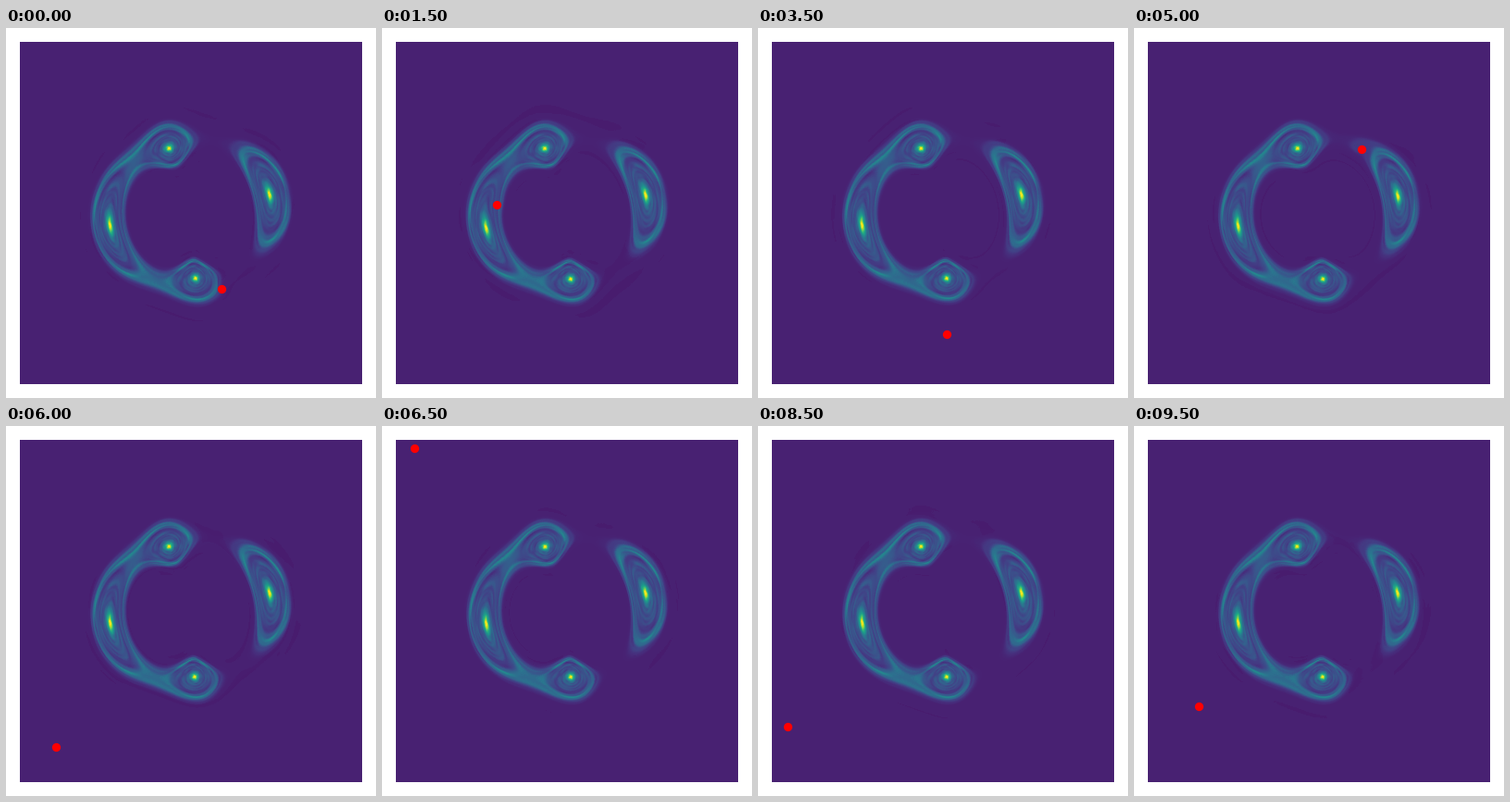
These frames come from a looping animation (400 px wide and 400 px high, 10000 ms). A matplotlib script:

```python
import numpy as np
import matplotlib.pyplot as plt
from matplotlib.animation import FuncAnimation

STAGE, MARGIN, SIZE = 400, 15, 370
INTERVAL = 500
BACKGROUND = 0.09

# Elliptical lens with external shear; its long axis leans away from the vertical.
LENS_CENTER = (195.3, 201.0)
LEAN = np.radians(11)
AXIS_RATIO, STRENGTH, SHEAR, BEND = 0.36, 55.7, -0.07, 0.004
SOURCE = (4.7, 1.2)

# Where the small perturbing mass lands at each step.
DOTS = [(233, 282), (200, 38), (160, 372), (124, 191), (324, 200),
        (66, 367), (26, 45), (204, 331), (66, 363), (341, 308),
        (246, 131), (200, 200), (54, 347), (35, 24), (230, 101),
        (66, 200), (190, 190), (32, 325), (210, 205), (70, 303)]

Y, X = np.mgrid[0:SIZE, 0:SIZE] + MARGIN + 0.5


def lens_frame(x, y):
    """Stage position in axes centred on the lens and turned with it."""
    dx, up = x - LENS_CENTER[0], LENS_CENTER[1] - y
    return (dx * np.cos(LEAN) + up * np.sin(LEAN),
            up * np.cos(LEAN) - dx * np.sin(LEAN))


def deflect(x, y):
    """Trace each pixel back to the plane of the lensed galaxy."""
    s = np.sqrt(1 - AXIS_RATIO ** 2)
    psi = np.hypot(x, AXIS_RATIO * y)
    ax = STRENGTH * np.arctanh(s * x / psi)
    ay = STRENGTH * np.arctan(s * y / psi)
    radius = np.hypot(x, y)
    bend = BEND * (radius - np.hypot(ax, ay)) ** 2 / radius
    return x * (1 - SHEAR - bend) - ax, y * (1 + SHEAR - bend) - ay


def polar_noise(rng, radial, angular, shape=(200, 192)):
    """Unit noise over radius (quarter pixels) and angle, smoothed along each."""
    fr, fa = np.fft.fftfreq(shape[0])[:, None], np.fft.fftfreq(shape[1])
    kernel = np.exp(-2 * np.pi ** 2 * ((radial * fr) ** 2 + (angular * fa) ** 2))
    noise = np.fft.ifft2(np.fft.fft2(rng.normal(size=shape)) * kernel).real
    return noise / noise.std()


def sample(noise, radius, angle):
    rows = np.minimum(radius * 4, noise.shape[0] - 1).astype(int)
    cols = (angle / (2 * np.pi) * noise.shape[1]).astype(int) % noise.shape[1]
    return noise[rows, cols]


GRID = lens_frame(X, Y)
TRACED = deflect(*GRID)
rng = np.random.default_rng(7)
TEXTURE = 0.75 * polar_noise(rng, 2, 7) + 0.5 * polar_noise(rng, 5, 14)


def galaxy(x, y, smudges):
    radius = np.hypot(x, y)
    angle = np.arctan2(y, x) + 0.06 * radius
    disk = 0.11 / (1 + np.exp(np.clip((radius - 22.3) / 0.7, -40, 40)))
    ring = 0.14 * np.exp(-((radius - 18.3) / 1.8) ** 2)
    bulge = np.exp(-(radius / 3.2) ** 1.15)
    grain = np.clip(1 + 0.32 * sample(TEXTURE, radius, angle), 0.2, 1.8)
    outskirts = (radius > 23) & (radius < 33)
    stains = 0.012 * outskirts * (sample(smudges, radius, angle) > 1.2)
    return (disk + ring) * grain + bulge - stains


def brightness(index):
    px, py = lens_frame(*DOTS[index])
    dx, dy = GRID[0] - px, GRID[1] - py
    pull = 30 / (dx ** 2 + dy ** 2 + 80)
    smudges = polar_noise(np.random.default_rng(index), 5, 6)
    light = galaxy(TRACED[0] - pull * dx - SOURCE[0],
                   TRACED[1] - pull * dy - SOURCE[1], smudges)
    return np.clip(BACKGROUND + light, 0, 1)


fig = plt.figure(figsize=(4, 4), dpi=100, facecolor="white")
inset = MARGIN / STAGE
ax = fig.add_axes([inset, inset, SIZE / STAGE, SIZE / STAGE])
ax.axis("off")
bounds = (MARGIN, MARGIN + SIZE, MARGIN + SIZE, MARGIN)
picture = ax.imshow(brightness(0), cmap="viridis", vmin=0, vmax=1,
                    extent=bounds, interpolation="nearest")
marker, = ax.plot([], [], "o", color="red", markersize=5.7, clip_on=False)
ax.set_xlim(bounds[:2])
ax.set_ylim(bounds[2:])


def update(index):
    x, y = DOTS[index]
    picture.set_data(brightness(index))
    marker.set_data([x - 0.3], [y - 0.3])
    return picture, marker


animation = FuncAnimation(fig, update, frames=len(DOTS), interval=INTERVAL,
                          repeat=True, repeat_delay=0)
plt.show()
```
